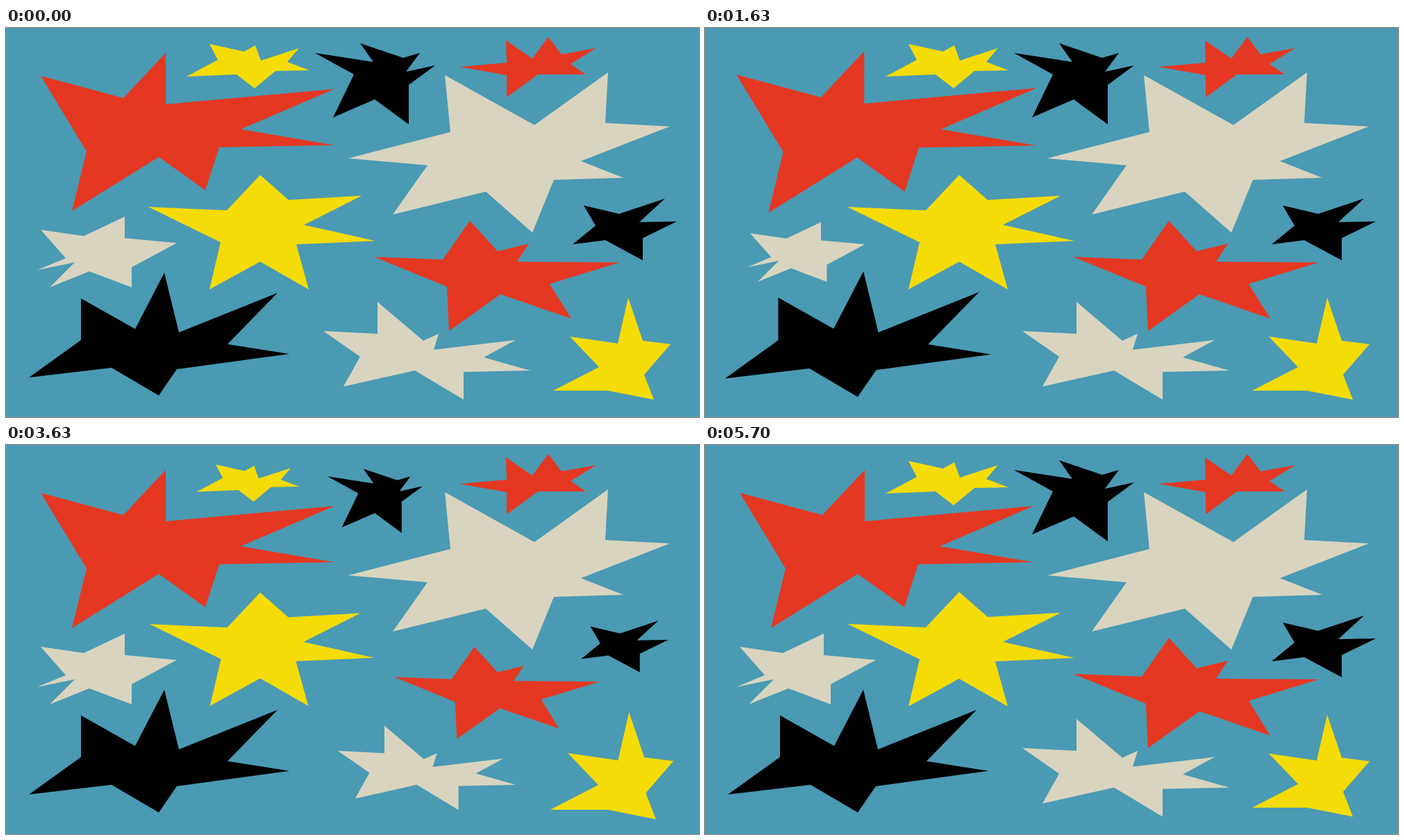
Write an HTML page that moves like this. It is 998x561 px and loops after 5.73 s.

```html
<!DOCTYPE html>
<html lang="en">
<head>
<meta charset="utf-8">
<title>Pulsing stars</title>
<style>
  html, body { margin: 0; width: 100%; height: 100%; overflow: hidden; background: #4b9ab3; }
  svg { display: block; width: 100%; height: 100%; }
  polygon { transform-box: fill-box; transform-origin: center; }
  .red { fill: #e53822; }
  .yellow { fill: #f5dc06; }
  .cream { fill: #d8d4c0; }
  .black { fill: #000; }
</style>
</head>
<body>
<!-- data-start: frame at which the star begins its pulse -->
<svg viewBox="0 0 998 561">
  <polygon class="red" data-start="31.8" points="50,69 169,101 230,36 230,110 473,88 338,146 473,169 307,172 287,234 220,186 95,264 116,178"/>
  <polygon class="yellow" data-start="13.2" points="293,23 343,34 359,25 367,47 422,29 405,49 437,61 388,62 358,87 332,67 260,70 305,46"/>
  <polygon class="black" data-start="18.3" points="445,36 529,49 510,22 572,43 596,36 576,63 618,54 580,82 580,139 531,103 471,129 501,67"/>
  <polygon class="red" data-start="24.5" points="653,56 721,50 720,18 758,44 781,13 800,38 850,29 813,52 835,67 766,67 721,100 721,68"/>
  <polygon class="cream" data-start="24.5" points="632,68 761,140 867,64 863,137 956,142 828,192 889,216 789,219 758,295 691,236 557,269 607,198 493,188 640,150"/>
  <polygon class="yellow" data-start="22.2" points="366,212 407,248 512,242 429,284 532,307 418,312 436,377 366,337 293,377 309,309 205,258 318,263"/>
  <polygon class="cream" data-start="39.1" points="50,291 112,300 171,272 171,303 246,310 181,345 181,374 120,351 63,374 99,338 45,349 86,332"/>
  <polygon class="black" data-start="13.2" points="832,256 883,268 949,246 912,280 966,279 917,303 917,335 863,306 816,312 849,285"/>
  <polygon class="red" data-start="13.2" points="530,330 629,334 668,278 708,322 753,311 736,337 884,338 783,369 814,419 712,384 638,437 635,373"/>
  <polygon class="black" data-start="31.8" points="108,390 186,434 228,353 249,439 391,382 319,456 408,470 246,492 220,530 152,490 33,504 108,450"/>
  <polygon class="cream" data-start="19.5" points="535,395 601,451 623,441 616,464 734,450 688,475 755,494 659,496 659,536 589,494 486,517 510,474 457,437 535,441"/>
  <polygon class="yellow" data-start="9" points="896,389 917,451 957,456 919,500 933,536 867,523 788,523 854,489 812,445 881,455"/>
</svg>
<script>
const LOOP = 5730;
const CYCLE = 86; // frames per pulse cycle, two cycles per loop
const KEYS = [[0, 1], [7, 0.72], [14, 1.05], [20, 1]]; // frame, scale
const stars = [...document.querySelectorAll('polygon')];

const ease = x => x * x * (3 - 2 * x);

function pulse(frame) {
  if (frame <= 0) return 1;
  for (let i = 1; i < KEYS.length; i++) {
    const [from, a] = KEYS[i - 1];
    const [to, b] = KEYS[i];
    if (frame < to) return a + (b - a) * ease((frame - from) / (to - from));
  }
  return 1;
}

// Three frames per 100 ms, held 30, 40 and 30 ms.
function frameAt(ms) {
  const rest = ms % 100;
  return Math.floor(ms / 100) * 3 + (rest >= 30) + (rest >= 70);
}

function draw() {
  const frame = frameAt(performance.now() % LOOP) % CYCLE;
  for (const star of stars) {
    star.style.transform = `scale(${pulse(frame - star.dataset.start)})`;
  }
  requestAnimationFrame(draw);
}
draw();
</script>
</body>
</html>
```
